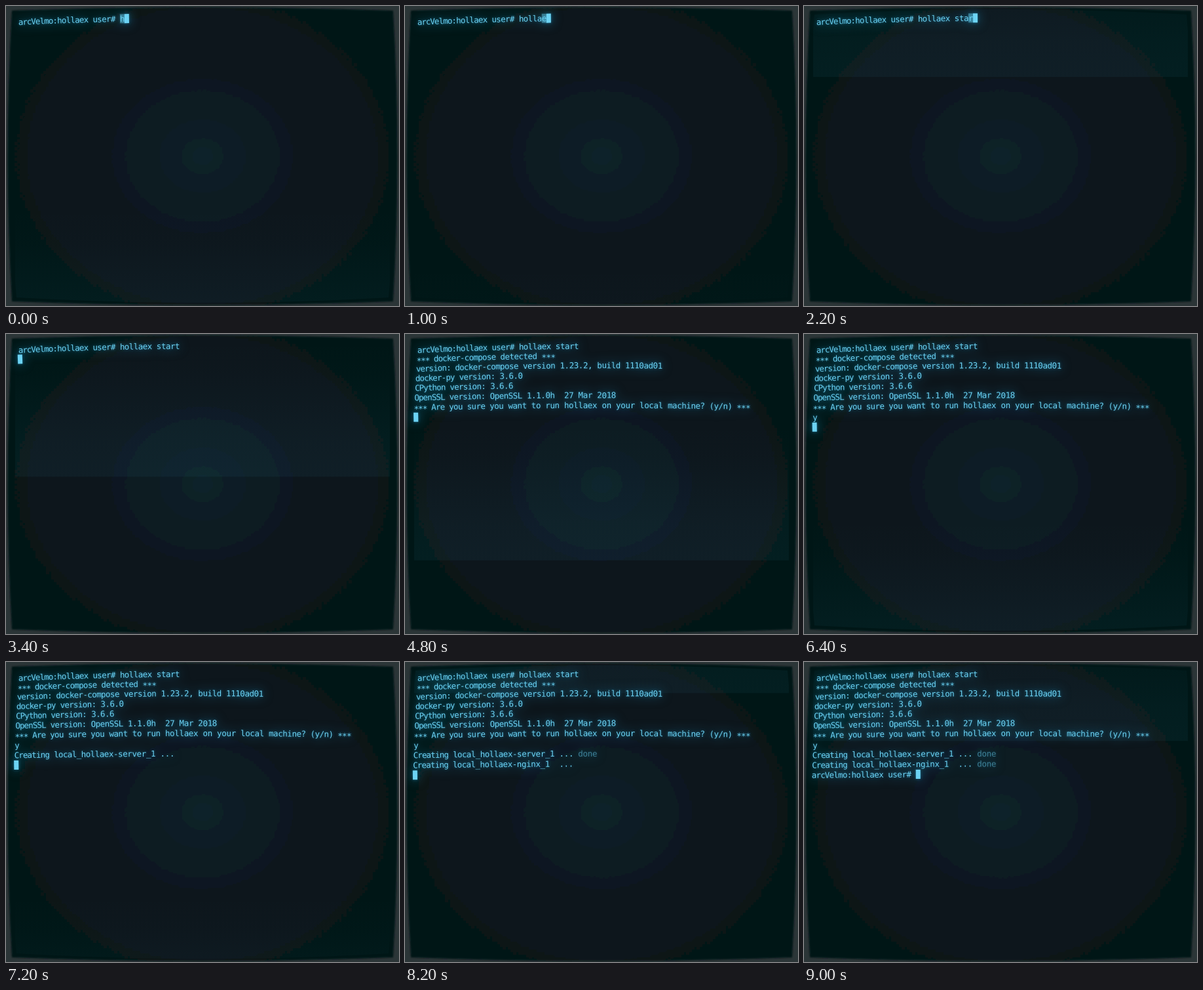
Recreate the animation shown at these times as an HTML page. Size 600 by 457 pixels, loop 9.2 s.

```html
<!DOCTYPE html>
<html lang="en">
<head>
<meta charset="utf-8">
<title>Terminal</title>
<style>
  html, body { margin: 0; width: 100%; height: 100%; overflow: hidden; background: #2b3537; }
  svg { display: block; }
  text { font: 12.5px "DejaVu Sans Mono", monospace; white-space: pre; }
  #screen { fill: #6cd3f4; filter: drop-shadow(0 0 2px #1c86b099) drop-shadow(0 0 8px #1a7ba3bb); }
</style>
</head>
<body>
<svg width="600" height="457" viewBox="0 0 600 457">
  <defs>
    <radialGradient id="tube" gradientUnits="userSpaceOnUse" cx="300" cy="229" r="370" gradientTransform="translate(0 34) scale(1 .85)">
      <stop offset="0" stop-color="#10222a"/>
      <stop offset=".3" stop-color="#0b1a21"/>
      <stop offset=".7" stop-color="#07141a"/>
      <stop offset="1" stop-color="#061317"/>
    </radialGradient>
    <linearGradient id="sweep" x1="0" y1="0" x2="0" y2="1">
      <stop offset="0" stop-color="#3fb4dc" stop-opacity="0"/>
      <stop offset=".25" stop-color="#3fb4dc" stop-opacity=".009"/>
      <stop offset=".5" stop-color="#3fb4dc" stop-opacity=".028"/>
      <stop offset=".75" stop-color="#3fb4dc" stop-opacity=".047"/>
      <stop offset="1" stop-color="#3fb4dc" stop-opacity=".055"/>
    </linearGradient>
    <clipPath id="glass"><path d="M16 13Q300 -3 584 13Q604 228 584 444Q300 460 16 444Q-4 228 16 13Z"/></clipPath>
    <filter id="soft"><feGaussianBlur stdDeviation="1.3"/></filter>
  </defs>
  <rect width="600" height="457" fill="#2b3537"/>
  <path d="M9 7Q300 -3 591 7Q604 228 591 450Q300 461 9 450Q-4 228 9 7Z" fill="url(#tube)" filter="url(#soft)"/>
  <g clip-path="url(#glass)"><rect id="band" x="14" width="572" height="210" fill="url(#sweep)"/></g>
  <g id="screen"></g>
</svg>
<script>
const LOOP = 9200, STEP = 200, SWEEP = 1 / 0.00015;
const PROMPT = "arcVelmo:hollaex user# ";
const COMMAND = "hollaex start";
const OUTPUT = [
  [3000, "\n"],
  [3800, "*** docker-compose detected ***\n"],
  [4200, "version: docker-compose version 1.23.2, build 1110ad01\n" +
         "docker-py version: 3.6.0\nCPython version: 3.6.6\n" +
         "OpenSSL version: OpenSSL 1.1.0h  27 Mar 2018\n" +
         "*** Are you sure you want to run hollaex on your local machine? (y/n) ***\n"],
  [5200, "y"],
  [6000, "\n"],
  [6600, "Creating local_hollaex-server_1 ...\n"],
  [7800, "Creating local_hollaex-nginx_1  ...\n"],
  [8600, PROMPT],
];
const DONE = [[7800, 8], [8600, 9]];

const screen = document.getElementById("screen");
const band = document.getElementById("band");

// Bulge a cell of the text grid onto the curved glass.
function place(col, row) {
  const dx = 2.8 + col * 7.26 - 300, dy = 12.5 + row * 15.8 - 228.5;
  const k = 1 - 0.117 * ((dx / 600) ** 2 + (dy / 457) ** 2);
  const slope = -0.234 * dx * dy / 360000;
  return { x: 300 + dx * k, y: 228.5 + dy * k, angle: slope * 180 / Math.PI };
}

function add(name, attributes, content = "") {
  const node = document.createElementNS("http://www.w3.org/2000/svg", name);
  for (const key in attributes) node.setAttribute(key, attributes[key]);
  node.textContent = content;
  screen.append(node);
}

function write(text, row, col = 0, opacity = 1) {
  const cells = [...text].map((ch, i) => {
    const p = place(col + i, row);
    p.y += ch === "*" ? 7 : 4.6;
    return p;
  });
  const list = key => cells.map(p => p[key].toFixed(2)).join(" ");
  add("text", { x: list("x"), y: list("y"), rotate: list("angle"), opacity }, text);
}

function block({ col, row }, opacity) {
  const p = place(col, row);
  add("rect", { y: -7, width: 7, height: 14, opacity,
    transform: `translate(${p.x} ${p.y}) rotate(${p.angle})` });
}

function linesAt(t) {
  const typed = Math.max(0, Math.floor(t / STEP) + 1);
  const shown = OUTPUT.filter(([at]) => t >= at).map(([, text]) => text);
  return (PROMPT + COMMAND.slice(0, typed) + shown.join("")).split("\n");
}

function cursorAt(t) {
  const lines = linesAt(t);
  return { row: lines.length - 1, col: lines.at(-1).length };
}

function draw(t) {
  screen.replaceChildren();
  linesAt(t).forEach((line, row) => line && write(line, row));
  for (const [at, row] of DONE) if (t >= at) write("done", row, 36, 0.5);

  const cursor = cursorAt(t), previous = cursorAt(t - STEP);
  if (cursor.row !== previous.row || cursor.col !== previous.col) block(previous, 0.42);
  block(cursor, 1);

  const phase = ((t - 1013 + SWEEP) % SWEEP) / SWEEP;
  band.setAttribute("y", phase * 607 - 210);
}

const start = performance.now();
let last = -1;
function tick() {
  const t = Math.floor((performance.now() - start) % LOOP / STEP) * STEP;
  if (t !== last) draw(last = t);
  requestAnimationFrame(tick);
}
tick();
</script>
</body>
</html>
```
